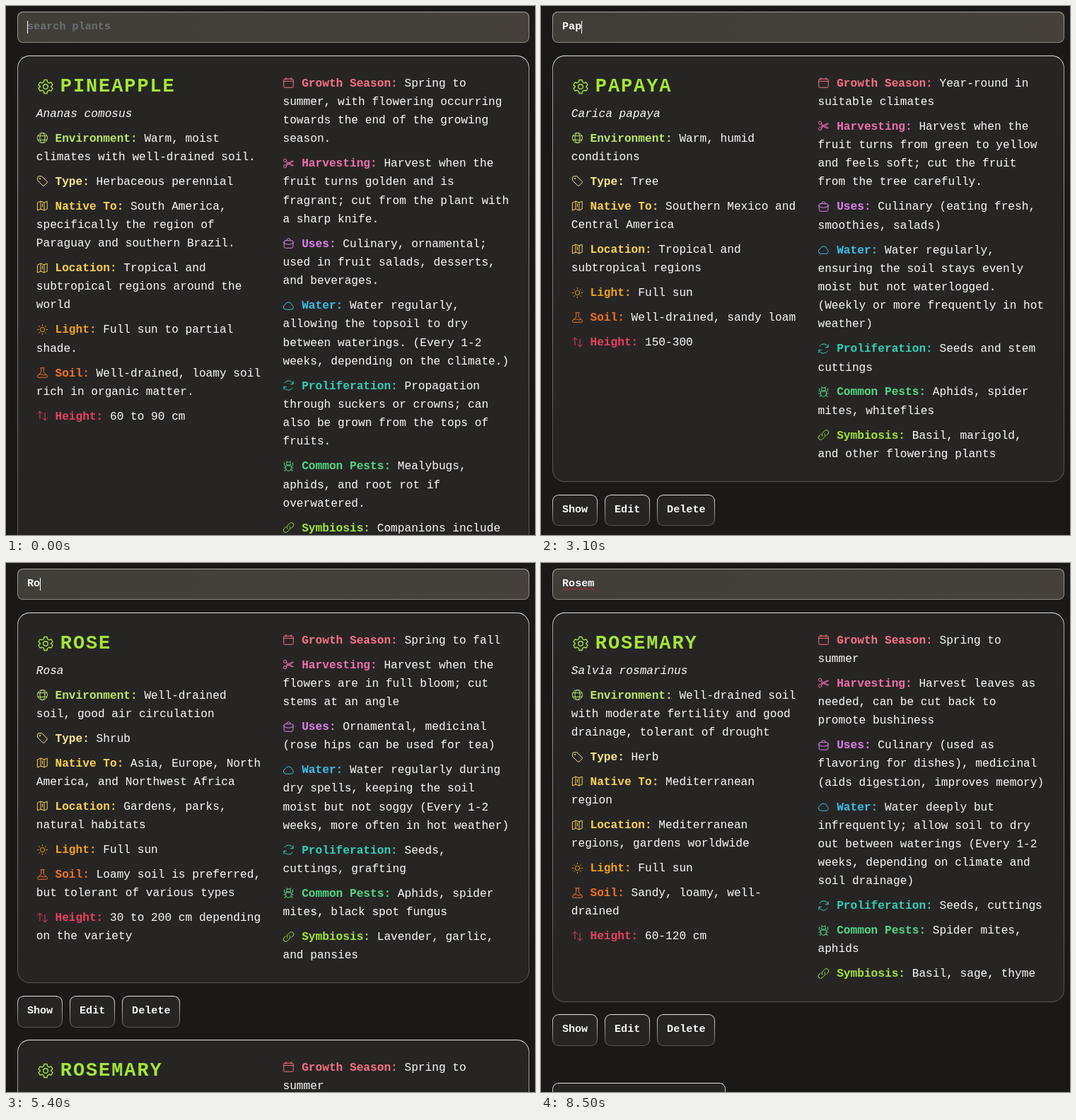
Recreate the animation shown at these times as an HTML page. Size 748 px wide and 748 px high, loop 8600 ms.

```html
<!DOCTYPE html>
<html lang="en">
<head>
<meta charset="utf-8">
<title>Plant search</title>
<style>
html, body { margin: 0; width: 100%; height: 100%; overflow: hidden; background: #1b1917; }
body { position: relative; color: #fafaf9; font: 16.154px/26.2px "Liberation Mono", monospace; }
.panel { position: absolute; box-sizing: border-box; left: 16px; border: 1px solid transparent;
  background: linear-gradient(#272524, #272524) padding-box, linear-gradient(#e6e4e1, #aaa7a3 20px, #57534e) border-box; }
#search { top: 8px; width: 724px; height: 44px; border-radius: 8px;
  background: linear-gradient(90deg, #413e39, #45413a) padding-box, linear-gradient(#aaa69f, #8b8780) border-box; }
#search, .button { font-weight: bold; font-size: 15.14px; line-height: 41px; white-space: pre; }
#query, #hint { position: absolute; left: 13px; top: 0; }
#hint { color: #6b7078; }
#query.misspelled { text-decoration: underline wavy #d8262f 1px; text-underline-offset: 1px; }
#caret { position: absolute; top: 12px; width: 1px; height: 18px; background: #fff; }
.results { position: absolute; top: 70px; left: 0; width: 100%; }
.results .panel { position: relative; }
.card { width: 724px; padding: 25.7px 0 24.9px 25.8px; border-radius: 17.5px; display: flex; gap: 26.7px; }
.column { width: 322px; flex: none; }
p { margin: 0 0 8.75px; }
p:last-child { margin: 0; }
h2 { display: flex; align-items: center; margin: 0 0 8.75px; height: 34.2px; color: #a3e635;
  font-size: 27px; line-height: 34px; letter-spacing: 1.9px; }
h2 svg { width: 24px; height: 24px; margin: 1px 9px 0 1px; }
svg { width: 17px; height: 17px; vertical-align: -3.6px; fill: none; stroke: currentColor;
  stroke-width: 1.4; stroke-linecap: round; stroke-linejoin: round; }
.buttons { display: flex; gap: 10px; margin: 17.6px 0 17.6px 16px; }
.buttons .panel { left: 0; }
.button { height: 44.6px; padding: 0 12.9px; border-radius: 9px; }
.footer { width: 245px; height: 60px; margin-top: 52px; border-radius: 9px; }
</style>
</head>
<body>
<div id="search" class="panel"><span id="hint">search plants</span><span id="query"></span><i id="caret"></i></div>
<script>
const LOOP = 8600;

const mapIcon = '<path d="M2.5 5.5 8.500 3l7 2.5 6-2.5v15.5L15.5 21l-7-2.5-6 2.5zM8.5 3v15.5M15.5 5.5V21M12 8v6"/>';

// Each field: label, colour, icon drawn on a 24-unit square.
const fields = [
  ['Environment', '#bbe868', '<circle cx="12" cy="12" r="10"/><ellipse cx="12" cy="12" rx="5" ry="10"/><path d="M3 8h18M3 16h18"/>'],
  ['Type', '#fde68a', '<path d="M2.5 4.5a2 2 0 0 1 2-2H11l10 10a2 2 0 0 1 0 3l-5.5 5.5a2 2 0 0 1-3 0l-10-10z"/><circle cx="7" cy="7" r=".8"/>'],
  ['Native To', '#fcd34d', mapIcon],
  ['Location', '#fcd34d', mapIcon],
  ['Light', '#f0a11d', '<circle cx="12" cy="12" r="4.5"/><path d="M12 2v2M12 20v2M2 12h2M20 12h2M5 5l1.4 1.4M17.6 17.6 19 19M5 19l1.4-1.4M17.6 6.4 19 5"/>'],
  ['Soil', '#f27324', '<path d="M8 2.5h8M9.5 2.5v8C8.5 14 2 16 2 19q0 2.5 3 2.5h14q3 0 3-2.5c0-3-6.5-5-7.5-8.5v-8M5 16q4-2 7 0t7 0"/>'],
  ['Height', '#e9405f', '<path d="M7 18V3M2.5 7.5 7 3l4.5 4.5M17 6v15M12.5 16.5 17 21l4.5-4.5"/>'],
  ['Growth Season', '#fb7185', '<rect x="2.5" y="4.5" width="19" height="17" rx="2"/><path d="M2.5 9h19M7 2v4M17 2v4"/>'],
  ['Harvesting', '#f06fae', '<circle cx="5" cy="6" r="3"/><circle cx="5" cy="18" r="3"/><path d="M7.5 8 22 16.5h-4L7.5 11M7.5 16 22 7.5h-4L7.5 14"/>'],
  ['Uses', '#de80f0', '<rect x="3" y="6.5" width="18" height="15" rx="3"/><path d="M8 6.5q0-4 4-4t4 4M3 12q9 5 18 0M1.5 10h2M20.5 10h2"/>'],
  ['Water', '#38bfe8', '<path d="M6.5 20a5 5 0 0 1-1-9.8 7 7 0 0 1 13.5 1.3A4.5 4.5 0 0 1 18 20z"/>'],
  ['Proliferation', '#2fd0b8', '<path d="M21.5 4v5.5H16M21 9A9.5 9.5 0 0 0 4 7M2.5 20v-5.5H8M3 15a9.5 9.5 0 0 0 17 2"/>'],
  ['Common Pests', '#4fd983', '<path d="M7.5 9V6q0-2 4.500-2t4.500 2v3zM8 2l1.500 2.500M16 2l-1.500 2.500M6.500 11.500h11V16a5.500 5.500 0 0 1-11 0zM6.500 13 3.500 10.500V5.500M17.500 13l3-2.500V5.500M6.500 15.500H2.500M17.500 15.500h4M7.500 19l-3 1v2M16.500 19l3 1v2"/>'],
  ['Symbiosis', '#a3e635', '<path d="M10 14.5a4.5 4.5 0 0 1 0-6.5l4.5-4.5a4.6 4.6 0 0 1 6.5 6.5l-3 3M14 9.5a4.5 4.5 0 0 1 0 6.5l-4.5 4.5A4.6 4.6 0 0 1 3 14l3-3"/>'],
];

const gear = '<circle cx="12" cy="12" r="3.3"/><path d="M10 2.5h4l.7 3 2.3 1.3 3-.8 2 3.5-2.2 2.1v.8l2.2 2.1-2 3.5-3-.8-2.3 1.3-.7 3h-4l-.7-3L7 17.2l-3 .8-2-3.5 2.2-2.1v-.8L2 9.5 4 6l3 .8 2.3-1.3z"/>';

// Name, Latin name, then one text per field.
const pineapple = ['PINEAPPLE', 'Ananas comosus',
  'Warm, moist climates with well-drained soil.',
  'Herbaceous perennial',
  'South America, specifically the region of Paraguay and southern Brazil.',
  'Tropical and subtropical regions around the world',
  'Full sun to partial shade.',
  'Well-drained, loamy soil rich in organic matter.',
  '60 to 90 cm',
  'Spring to summer, with flowering occurring towards the end of the growing season.',
  'Harvest when the fruit turns golden and is fragrant; cut from the plant with a sharp knife.',
  'Culinary, ornamental; used in fruit salads, desserts, and beverages.',
  'Water regularly, allowing the topsoil to dry between waterings. (Every 1-2 weeks, depending on the climate.)',
  'Propagation through suckers or crowns; can also be grown from the tops of fruits.',
  'Mealybugs, aphids, and root rot if overwatered.',
  'Companions include beans, garlic, and legumes.'];
const papaya = ['PAPAYA', 'Carica papaya',
  'Warm, humid conditions',
  'Tree',
  'Southern Mexico and Central America',
  'Tropical and subtropical regions',
  'Full sun',
  'Well-drained, sandy loam',
  '150-300',
  'Year-round in suitable climates',
  'Harvest when the fruit turns from green to yellow and feels soft; cut the fruit from the tree carefully.',
  'Culinary (eating fresh, smoothies, salads)',
  'Water regularly, ensuring the soil stays evenly moist but not waterlogged. (Weekly or more frequently in hot weather)',
  'Seeds and stem cuttings',
  'Aphids, spider mites, whiteflies',
  'Basil, marigold, and other flowering plants'];
const rose = ['ROSE', 'Rosa',
  'Well-drained soil, good air circulation',
  'Shrub',
  'Asia, Europe, North America, and Northwest Africa',
  'Gardens, parks, natural habitats',
  'Full sun',
  'Loamy soil is preferred, but tolerant of various types',
  '30 to 200 cm depending on the variety',
  'Spring to fall',
  'Harvest when the flowers are in full bloom; cut stems at an angle',
  'Ornamental, medicinal (rose hips can be used for tea)',
  'Water regularly during dry spells, keeping the soil moist but not soggy (Every 1-2 weeks, more often in hot weather)',
  'Seeds, cuttings, grafting',
  'Aphids, spider mites, black spot fungus',
  'Lavender, garlic, and pansies'];
const rosemary = ['ROSEMARY', 'Salvia rosmarinus',
  'Well-drained soil with moderate fertility and good drainage, tolerant of drought',
  'Herb',
  'Mediterranean region',
  'Mediterranean regions, gardens worldwide',
  'Full sun',
  'Sandy, loamy, well-drained',
  '60-120 cm',
  'Spring to summer',
  'Harvest leaves as needed, can be cut back to promote bushiness',
  'Culinary (used as flavoring for dishes), medicinal (aids digestion, improves memory)',
  'Water deeply but infrequently; allow soil to dry out between waterings (Every 1-2 weeks, depending on climate and soil drainage)',
  'Seeds, cuttings',
  'Spider mites, aphids',
  'Basil, sage, thyme'];

const icon = shape => `<svg viewBox="0 0 24 24">${shape}</svg>`;

function cardHtml([name, latin, ...texts]) {
  const rows = texts.map((text, i) => {
    const [label, color, shape] = fields[i];
    return `<p><span style="color:${color}">${icon(shape)} <b>${label}:</b></span> ${text}</p>`;
  });
  const buttons = ['Show', 'Edit', 'Delete'].map(s => `<div class="panel button">${s}</div>`).join('');
  return `<div class="panel card">
    <div class="column"><h2>${icon(gear)}${name}</h2><p><i>${latin}</i></p>${rows.slice(0, 7).join('')}</div>
    <div class="column">${rows.slice(7).join('')}</div>
  </div><div class="buttons">${buttons}</div>`;
}

const pages = [[pineapple], [papaya], [rose, rosemary], [rosemary]].map(plants => {
  const page = document.createElement('div');
  page.className = 'results';
  page.innerHTML = plants.map(cardHtml).join('') + '<div class="panel footer"></div>';
  document.body.append(page);
  return page;
});

const typing = [[0, ''], [500, 'P'], [700, 'Pa'], [1000, 'Pap'], [3400, 'Pa'], [3600, 'P'], [3800, ''],
  [4600, 'R'], [5000, 'Ro'], [5500, 'Ros'], [5600, 'Rose'], [5800, 'Rosem']];
const shownPage = [[0, 0], [1200, 1], [3900, 0], [5100, 2], [6100, 3]];
const BLUR = 7800;

const latest = (steps, t) => steps.findLast(([start]) => start <= t);
const [hint, query, caret] = ['hint', 'query', 'caret'].map(id => document.getElementById(id));

function draw(now) {
  const t = now % LOOP;
  const [typedAt, text] = latest(typing, t);
  const current = latest(shownPage, t)[1];
  pages.forEach((page, i) => page.style.display = i === current ? 'block' : 'none');
  query.textContent = text;
  query.className = t >= BLUR ? 'misspelled' : '';
  hint.hidden = text !== '';
  caret.style.left = 13 + text.length * 9.086 + 'px';
  caret.hidden = t >= BLUR || (t - typedAt) % 1000 >= 500;
}

const start = performance.now();
function tick() {
  draw(performance.now() - start);
  requestAnimationFrame(tick);
}
tick();
</script>
</body>
</html>
```
